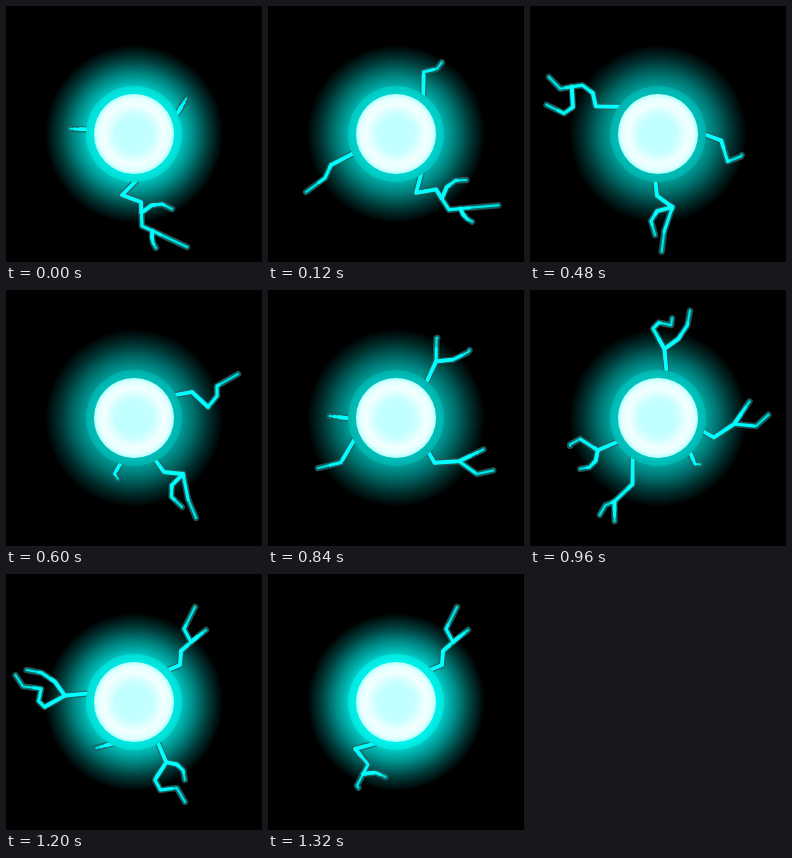
These frames come from a looping animation (256x256 px, 1440 ms). An HTML page with a canvas:

```html
<!DOCTYPE html>
<html>
<head>
<meta charset="utf-8">
<style>
html, body { margin: 0; width: 100%; height: 100%; overflow: hidden; background: #000; }
canvas { display: block; width: 100vmin; height: 100vmin; }
</style>
</head>
<body>
<canvas id="stage" width="256" height="256"></canvas>
<script>
const ctx = document.getElementById('stage').getContext('2d');
const STEP = 120, STEPS = 12;

// A bolt turns 30 degrees per step; it skips one turn before the last two steps.
const turnAt = step => Math.min(step + (step > 9), 11);

const lerp = (a, b, t) => a.map((v, i) => v + (b[i] - v) * t);
const dist = (a, b) => Math.hypot(b[0] - a[0], b[1] - a[1]);

// A line with the distance along the bolt at which it starts to grow.
const line = (points, from, rate) => ({ path: new Path2D('M' + points.join(' ')), from, rate,
  size: points.slice(1).reduce((sum, p, i) => sum + dist(points[i], p), 0) });

// A fork leaves the trunk at a (fractional) corner and bows sideways on its way to the tip.
function fork(trunk, [at, x, y, bow]) {
  const i = Math.floor(at), tip = [x, y];
  const root = at > i ? lerp(trunk[i], trunk[i + 1], at - i) : trunk[i];
  const side = [(root[1] - y) * bow, (x - root[0]) * bow];
  const bend = t => lerp(root, tip, t).map((v, k) => v + side[k]);
  const way = trunk.slice(0, i + 1);
  return line([root, bend(.35), bend(.7), tip], line([...way, root], 0, 1).size, 1.5);
}

// turn: the turn at which the corners are given; speed: pixels grown per step
function bolt(turn, first, life, speed, corners, ...forks) {
  const trunk = corners.split(' ').map(p => p.split(',').map(Number));
  return { turn, first, life, speed,
    lines: [line(trunk, 0, 1), ...forks.map(f => fork(trunk, f))] };
}

const bolts = [
  bolt(0, 10, 4, 50, '131,174 116,189 135,196 136,220 149,226 181,241', [2.45, 166, 203, -.2], [3.8, 150, 242, .1]),
  bolt(3, 0, 5, 27, '108,85 88,73 92,60 87,48 77,44 66,40 62,24', [4, 46, 47, -.55]),
  bolt(1, 0, 3, 46, '86,147 63,159 57,172 38,186'),
  bolt(5, 3, 4, 37, '169,105 186,102 202,117 211,106 211,96 232,84'),
  bolt(5, 2, 4, 31, '150,171 158,182 177,184 182,209 190,228', [2, 176, 217, .33]),
  bolt(9, 5, 5, 30, '174,117 186,117 197,95 217,86 222,70', [2, 199, 68, 0]),
  bolt(9, 6, 5, 27, '111,82 99,65 79,53 81,45 93,41 86,24 92,12', [1, 102, 19, .13]),
  bolt(9, 7, 4, 36, '104,170 92,186 71,185 65,195 75,208 67,222', [1, 86, 211, -.22]),
  bolt(9, 6, 4, 32, '126,175 139,198 132,222 126,230 126,241', [2, 142, 239, 0]),
  bolt(11, 8, 4, 31, '162,96 174,91 175,77 185,68 178,55 189,33', [3, 200, 56, 0])
];

// width, colour, share of the visible length: the core tapers towards the tip
const strokes = [
  [6.5, 'rgba(60,88,88,.75)', 1], [4.5, '#007476', 1],
  [2, '#00e6e6', 1], [3, '#00f8f8', .75], [3.8, '#00ffff', .45]
];

function disc(r, stops) {
  const fill = ctx.createRadialGradient(128, 128, 0, 128, 128, r);
  for (const [at, color] of stops) fill.addColorStop(at / r, color);
  ctx.fillStyle = fill;
  ctx.beginPath();
  ctx.arc(128, 128, r, 0, 7);
  ctx.fill();
}

function drawBolt({ turn, first, life, speed, lines }, step) {
  const age = (step - first + STEPS) % STEPS;
  if (age >= life) return;
  ctx.save();
  ctx.translate(128, 128);
  ctx.rotate((turn - turnAt(step)) * Math.PI / 6);
  ctx.translate(-128, -128);
  for (const [width, color, share] of strokes) {
    ctx.lineWidth = width;
    ctx.strokeStyle = color;
    for (const { path, from, rate, size } of lines) {
      const shown = Math.min(size, (18 + speed * age - from) * rate);
      if (shown <= 0) continue;
      ctx.setLineDash([shown * share, 999]);
      ctx.stroke(path);
    }
  }
  ctx.restore();
}

const teal = v => `rgb(0,${v},${v * .97})`;

function draw(now) {
  const step = Math.floor(now / STEP) % STEPS;
  const pulse = ((1 + Math.cos((step - 11) * Math.PI / 6)) / 2) ** 3;
  const halo = 160 + 50 * pulse, ring = 182 + 53 * pulse;
  ctx.fillStyle = '#000';
  ctx.fillRect(0, 0, 256, 256);
  disc(89, [[46, teal(halo)], [60, teal(halo * .68)], [75, teal(halo * .29)], [89, '#000']]);
  ctx.lineJoin = ctx.lineCap = 'round';
  for (const b of bolts) drawBolt(b, step);
  disc(48, [[40, teal(ring + 8)], [48, teal(ring - 6)]]);
  disc(40, [[0, '#bcffff'], [18, '#c4ffff'], [30, '#f2ffff'], [36, '#e4ffff'], [40, '#b0fffc']]);
  requestAnimationFrame(draw);
}
requestAnimationFrame(draw);
</script>
</body>
</html>
```
